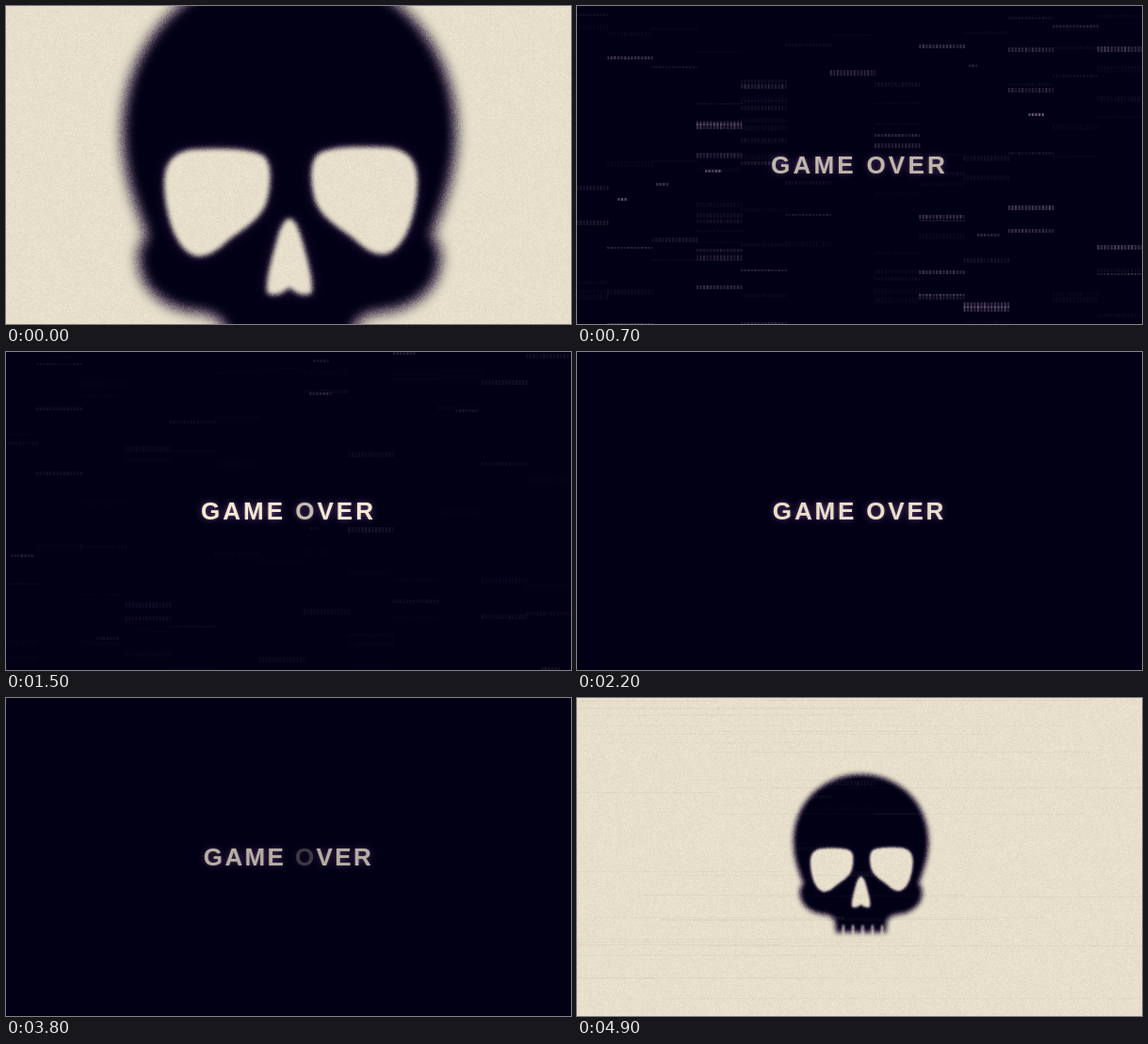
Recreate the animation shown at these times as an HTML page with a canvas. Size 600x338 px, loop 5 s.

```html
<!DOCTYPE html>
<html lang="en">
<head>
<meta charset="utf-8">
<title>Game over</title>
<style>
html, body { margin: 0; width: 100%; height: 100%; overflow: hidden; background: #010015; }
#stage { position: relative; width: 600px; height: 338px; overflow: hidden; }
canvas { position: absolute; left: 0; top: 0; }
#title {
  position: absolute; left: 0; top: 154px; width: 600px;
  font: bold 26px/30px "Liberation Sans", Arial, sans-serif;
  text-align: center; white-space: pre; font-kerning: none;
  color: #f4ebd3;
  text-shadow: 0 0 3px rgba(150, 105, 150, .5), 0 0 9px rgba(115, 70, 135, .75);
}
</style>
</head>
<body>
<div id="stage">
  <canvas id="view" width="600" height="338"></canvas>
  <div id="title"></div>
</div>
<script>
const W = 600, H = 338, LOOP = 5000, STEP = 100;
const DARK = [1, 0, 21], PAPER = [231, 223, 203], HALO = [50, 26, 50];
const CX = 302, CY = 165, ZOOM = 2.47, CELL = 47.3;

const ctx = document.getElementById('view').getContext('2d');
const mask = new OffscreenCanvas(W, H).getContext('2d', { willReadFrequently: true });
const title = document.getElementById('title');
const letters = [...'GAME OVER'].map(ch => {
  const span = document.createElement('span');
  span.textContent = ch;
  title.append(span);
  return span;
});

// A path and its mirror image about a vertical axis
function mirrored(data, axis, dy = 0) {
  const left = new Path2D(data), right = new Path2D();
  right.addPath(left, new DOMMatrix([-1, 0, 0, 1, 2 * axis, dy]));
  return [left, right];
}

const head = mirrored(`M301 -43 C200 -43 123 33 123 135 C123 180 138 215 149 245
  C140 252 137 266 142 283 C147 305 172 323 200 326 C216 327 230 333 232 345
  L235 374 H301Z`, 301);
const eyes = mirrored(`M168 190 C168 165 178 152 208 152 C235 151 262 152 273 159
  C283 166 282 190 277 208 C270 229 249 238 234 251 C222 262 214 266 204 266
  C182 264 169 225 168 190Z`, 302.5, -2);
const nose = mirrored(`M301 226 C295 226 290 239 287 251 C282 269 276 289 277 304
  C281 309 292 308 301 299Z`, 301);
const gaps = new Path2D();
for (let i = 0; i < 5; i++) gaps.rect(252 + 25.5 * i, 354, 5, 28);
const holes = [...eyes, ...nose, gaps];

function rng(seed) {
  let a = seed * 7919 + 17;
  return () => {
    a = (a + 0x6D2B79F5) | 0;
    let t = Math.imul(a ^ (a >>> 15), 1 | a);
    t = (t + Math.imul(t ^ (t >>> 7), 61 | t)) ^ t;
    return ((t ^ (t >>> 14)) >>> 0) / 4294967296;
  };
}

const clamp = v => Math.min(1, Math.max(0, v));

// Linear interpolation through [time, value] points
function track(points, t) {
  const i = points.findIndex(p => t <= p[0]);
  if (i === 0) return points[0][1];
  if (i < 0) return points[points.length - 1][1];
  const [t0, v0] = points[i - 1], [t1, v1] = points[i];
  return v0 + (v1 - v0) * (t - t0) / (t1 - t0);
}

const light = [[300, .1], [700, .78], [1500, 1], [3000, .91], [3800, .74], [4600, 1]];
const spacing = [[600, 3.25], [4100, 2.3], [4800, 3.25]];
const dip = (t, at) => clamp(1 - Math.abs(t - at) / 250);

function glitchLevel(t) {
  if (t >= 4900) return .4;
  return t < 2000 ? clamp((t - 200) / 300) * clamp((1900 - t) / 1200) : clamp((t - 4200) / 400);
}

function stamp(paths, color, blur, scale) {
  mask.save();
  mask.filter = `blur(${blur * scale}px)`;
  mask.translate(CX, CY);
  mask.scale(scale, scale);
  mask.translate(-CX, -CY);
  mask.fillStyle = color;
  for (const path of paths) mask.fill(path);
  mask.restore();
}

// Red: head, green: openings, blue: glow around the openings
function drawSkull(scale, seed) {
  mask.globalCompositeOperation = 'source-over';
  mask.fillStyle = '#000';
  mask.fillRect(0, 0, W, H);
  mask.globalCompositeOperation = 'lighter';
  stamp(head, '#f00', 7, scale);
  stamp(holes, '#0f0', 2.6, scale);
  stamp(holes, '#00f', 7, scale);
  const img = mask.getImageData(0, 0, W, H), d = img.data, rnd = rng(seed + 1);
  for (let i = 0; i < d.length; i += 4) {
    const body = d[i] / 255, hole = d[i + 1] / 255, halo = d[i + 2] / 255;
    const n = rnd() - .5, cover = body * (1 - hole);
    const k = clamp(cover + n * cover * (1 - cover) * .8);
    const tint = clamp(2.4 * body * (1 - body) + halo * .9);
    for (let c = 0; c < 3; c++) {
      const ink = DARK[c] + tint * HALO[c], paper = PAPER[c] + n * 12;
      d[i + c] = paper + (ink - paper) * k;
    }
  }
  ctx.putImageData(img, 0, 0);
}

function drawPaperLines(seed) {
  const rnd = rng(seed);
  for (let i = 0; i < 30; i++) {
    ctx.fillStyle = `rgba(110,98,84,${.03 + .05 * rnd()})`;
    ctx.fillRect(rnd() * 300 - 100, Math.floor(rnd() * H), 200 + rnd() * 400, 1);
  }
}

function drawBar(x, y, w, h, alpha, rnd) {
  ctx.fillStyle = `rgba(95,65,100,${alpha * .5})`;
  ctx.fillRect(x, y, w, h);
  for (let i = 0; i < w; i += 3.6) {
    ctx.fillStyle = `rgba(205,180,190,${alpha * (.4 + .6 * rnd())})`;
    ctx.fillRect(x + i, y, 1.6, h);
  }
}

// Ticked bars on a column grid: mostly faint, a few short and bright
function drawGlitch(seed, level) {
  const rnd = rng(seed + 100);
  ctx.globalCompositeOperation = 'screen';
  for (let i = 0; i < 120 * Math.sqrt(level); i++) {
    const x = -15 + CELL * Math.floor(rnd() * 13), y = Math.floor(rnd() * H);
    if (rnd() < .1) drawBar(x + rnd() * 24, y, 6 + rnd() * 20, 3, (.15 + .45 * rnd()) * level, rnd);
    else drawBar(x, y, CELL, 2 + Math.floor(rnd() * 5), (.04 + .3 * rnd() ** 4) * level, rnd);
  }
  ctx.globalCompositeOperation = 'source-over';
}

function setTitle(t) {
  const show = t >= 400 && t < 4900;
  title.style.visibility = show ? 'visible' : 'hidden';
  if (!show) return;
  title.style.letterSpacing = track(spacing, t) + 'px';
  const level = track(light, t), flicker = 1 - .2 * dip(t, 1500) - .67 * dip(t, 3800);
  letters.forEach((span, i) => {
    span.style.opacity = level * (i === 5 ? flicker : 1);
  });
}

function render(step) {
  const t = step * STEP;
  const zoomTime = t >= 4900 ? t - LOOP : t;
  if (zoomTime < 300) {
    drawSkull(ZOOM ** (zoomTime / STEP), step);
    if (zoomTime < 0) drawPaperLines(step);
  } else {
    ctx.fillStyle = `rgb(${DARK})`;
    ctx.fillRect(0, 0, W, H);
  }
  const level = glitchLevel(t);
  if (level > 0) drawGlitch(step, level);
  setTitle(t);
}

const start = performance.now();
let last = -1;
function tick() {
  const step = Math.floor((performance.now() - start) % LOOP / STEP);
  if (step !== last) render(last = step);
  requestAnimationFrame(tick);
}
tick();
</script>
</body>
</html>
```
